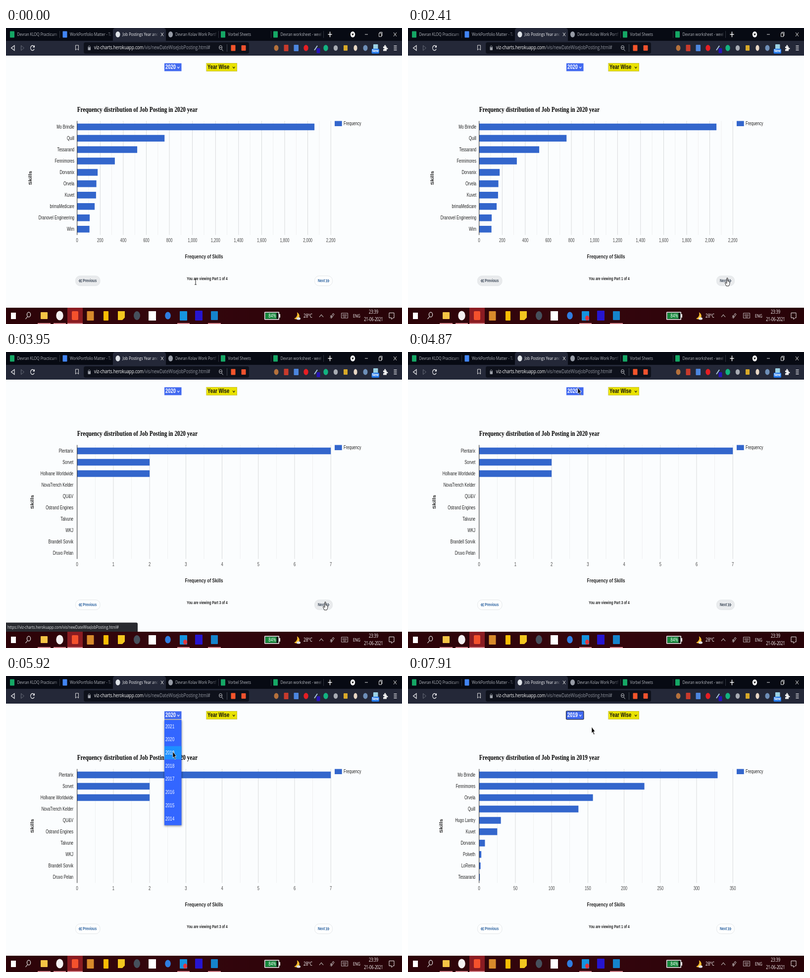
An HTML page with a canvas for the animation above (8000 ms loop, 800 px wide and 600 px high).

```html
<!DOCTYPE html>
<html lang="en">
<head>
<meta charset="utf-8">
<title>Job posting charts</title>
<style>
html, body { margin: 0; width: 100%; height: 100%; overflow: hidden; background: #fbfdfe; }
canvas { display: block; }
</style>
</head>
<body>
<canvas id="stage" width="800" height="600"></canvas>
<script>
const ctx = document.getElementById('stage').getContext('2d');
const LOOP = 8000;
const SQUEEZE = 0.75; // the 1366x768 desktop is shown at 4:3
const SANS = '"Liberation Sans", Arial, sans-serif';
const SERIF = '"Liberation Serif", serif';
const UI = '"Open Sans", sans-serif';
const BLUE = '#3366cc';
const URL_HOST = 'viz-charts.herokuapp.com';
const URL_PATH = '/vis/newDateWiseJobPosting.html#';

const charts = [
  { year: 2020, part: 1, max: 2200, step: 200, labelX: 138, skillsX: 50,
    names: ['Mo Brindle', 'Quill', 'Tessarand', 'Fennimores', 'Dorvanix', 'Orvela', 'Kuvet',
      'brimaMedicare', 'Dranovel Engineering', 'Wim'],
    values: [2058, 758, 521, 327, 178, 167, 164, 152, 109, 107] },
  { year: 2020, part: 2, max: 100, step: 10, labelX: 136, skillsX: 56,
    names: ['Hugo Lantry', 'Polveth', 'Gravet Holdings', 'QRV Tolven', 'Norwick Appliances',
      'LoRema', 'Fern Kit', 'Tarn Bulvo', 'QXTD', 'Trust of Velmora'],
    values: [91, 90, 63, 48, 46, 42, 32, 20, 17, 11] },
  { year: 2020, part: 3, max: 7, step: 1, labelX: 136, skillsX: 54,
    names: ['Plentarix', 'Sorvet', 'Hollvane Worldwide', 'NovaTrench Kelder', 'QU&V',
      'Ostrand Engines', 'Talvune', 'WKJ', 'Brandell Sorvik', 'Druvo Pelan'],
    values: [7, 2, 2, 0, 0, 0, 0, 0, 0, 0] },
  { year: 2019, part: 1, max: 350, step: 50, labelX: 136, skillsX: 68,
    names: ['Mo Brindle', 'Fennimores', 'Orvela', 'Quill', 'Hugo Lantry', 'Kuvet', 'Dorvanix',
      'Polveth', 'LoRema', 'Tessarand'],
    values: [329, 228, 157, 137, 30, 25, 8, 3, 2, 1] }
];

// Pointer bursts: first step, last step, number of steps, target x, y
const moves = [
  [40, 470, 4, 470, 535], [1080, 1400, 3, 684, 572], [1760, 1760, 1, 660, 525],
  [1920, 2090, 2, 645, 507], [4260, 4410, 2, 600, 440], [4710, 4870, 2, 343, 72],
  [5330, 5920, 5, 337, 153], [7250, 7580, 3, 408, 126], [7740, 7910, 2, 371, 103]
];

function pointerAt(t) {
  let x = 383, y = 508;
  for (const [start, end, steps, tx, ty] of moves) {
    if (t < start) break;
    const interval = (end - start) / Math.max(1, steps - 1) || 1;
    const k = Math.min(steps, Math.floor((t - start) / interval + 0.01) + 1) / steps;
    x += (tx - x) * k;
    y += (ty - y) * k;
  }
  return [x, y];
}

function rect(x, y, w, h, color, radius = 0) {
  ctx.fillStyle = color;
  ctx.beginPath();
  ctx.roundRect(x, y, w, h, radius);
  ctx.fill();
}

function dot(x, y, rx, ry, color) {
  ctx.fillStyle = color;
  ctx.beginPath();
  ctx.ellipse(x, y, rx, ry, 0, 0, 7);
  ctx.fill();
}

function ring(x, y, rx, ry, color, from = 0, to = 7) {
  ctx.strokeStyle = color;
  ctx.beginPath();
  ctx.ellipse(x, y, rx, ry, 0, from, to);
  ctx.stroke();
}

function path(d, x, y, stroke, fill, width = 1) {
  ctx.save();
  ctx.translate(x, y);
  const shape = new Path2D(d);
  if (fill) { ctx.fillStyle = fill; ctx.fill(shape); }
  if (stroke) { ctx.strokeStyle = stroke; ctx.lineWidth = width; ctx.stroke(shape); }
  ctx.restore();
}

function text(str, x, y, size, { font = SANS, color = '#222', align = 'left', weight = '', angle = 0 } = {}) {
  ctx.save();
  ctx.translate(x, y);
  ctx.scale(SQUEEZE, 1);
  ctx.rotate(angle);
  ctx.font = `${weight} ${size}px ${font}`;
  ctx.textAlign = align;
  ctx.textBaseline = 'middle';
  ctx.fillStyle = color;
  ctx.fillText(str, 0, 0);
  ctx.restore();
}

function tab(x, end, label, icon, active) {
  if (active) rect(x, 0, end - x, 27, '#242838', [5, 5, 0, 0]);
  if (icon) rect(x + 8, 6.5, 9, 13, icon, 1);
  else dot(x + 10, 13, 4.6, 6, active ? '#dfe3e8' : '#969ba5');
  const limit = end - (active ? 17 : 4);
  ctx.save();
  ctx.beginPath();
  ctx.rect(x, 0, limit - x, 26);
  ctx.clip();
  const fade = ctx.createLinearGradient(0, 0, (limit - x - 20) / SQUEEZE, 0);
  const color = active ? '#f4f5f7' : '#b4b7be';
  fade.addColorStop(0.85, color);
  fade.addColorStop(1, color + '50');
  text(label, x + (icon ? 22.5 : 19.5), 13, 9.7, { font: UI, color: fade });
  ctx.restore();
}

function drawBrowser() {
  rect(0, 0, 800, 27, '#070a13');
  rect(0, 26, 800, 30, '#242838');
  tab(0, 108, 'Devran KLDQ Practicum Gro', '#15a765');
  tab(106.5, 216, 'WorkPortfolio Matter - Ta', '#4285f4');
  tab(216, 323, 'Job Postings Year and', null, true);
  tab(322.5, 429, 'Devran Kolav Work Portfolio', null);
  tab(426, 535, 'Vorbel Sheets', '#15a765');
  tab(532, 641, 'Devran worksheet - week3', '#15a765');
  for (const x of [108, 429, 535, 641]) rect(x, 6, 0.8, 14, '#3a3e49');
  path('M0 0L5 7M5 0L0 7', 313, 9.5, '#eee');
  path('M0 4H8M4 -1.5V9.5', 650.5, 9, '#fff', null, 1.4);
  dot(700.5, 13, 4.7, 6, '#fff');
  path('M0 0H5L2.5 4Z', 698, 11.5, null, '#111');
  path('M0 0H6', 725, 13, '#ddd');
  path('M0 2H5V9H0ZM1.5 2V0H6.5V7H5', 753.5, 8.5, '#ddd');
  path('M0 0L6 8M6 0L0 8', 783, 9, '#ddd');

  path('M6.5 0V10L0 5Z', 10.5, 35.5, '#f0f0f2', null, 1.2);
  path('M0 0V10L6 5Z', 30.5, 35.5, '#686d79');
  ctx.lineWidth = 1.3;
  ring(53.5, 40.5, 3.8, 5, '#f0f0f2', 0.4, 5.5);
  path('M4 0V5H0Z', 54, 34.5, null, '#f0f0f2');
  path('M0 0H6V10L3 7L0 10Z', 140.5, 35, '#ddd');
  rect(157, 29, 334, 23, '#0e111b', 4);
  rect(165.5, 39, 5.5, 6, '#9ca0a8', 1);
  path('M0 4V2Q2 -2 4 2V4', 166.2, 36, '#9ca0a8');
  text(URL_HOST, 178, 40.5, 11, { font: UI, color: '#fff' });
  text(URL_PATH, 278, 40.5, 11, { font: UI, color: '#9599a3' });
  ctx.lineWidth = 1;
  ring(433.5, 39.5, 3, 4, '#c8cad0');
  path('M0 0L3 4M-4 -3H0', 435.5, 42.5, '#c8cad0');
  rect(446, 33, 0.8, 15, '#555a66');
  rect(454.5, 34.5, 9, 12, '#f4552b', 1);
  rect(475.5, 35, 9, 11, '#f0522e', 1);

  dot(546, 40.5, 4.5, 6, '#b5713c');
  rect(561.5, 34, 9, 13, '#c83a2c', 1);
  rect(581.5, 34, 9.5, 13, '#4c86df', 1);
  dot(606, 40.5, 4.7, 6.2, '#e51e24');
  path('M0 9L6 0', 623, 36, '#a9c5df', null, 2);
  rect(627.5, 41, 7, 10, '#2714b8', 1);
  dot(646, 40.5, 4.7, 6.2, '#13b381');
  dot(666, 40.5, 4.2, 5.5, '#a8acb4');
  rect(682, 35, 8, 11, '#d8a928', 1);
  dot(706, 40.5, 3.6, 6, '#e8d7c5');
  dot(726, 40.5, 4.5, 6, '#6e8fb8');
  rect(742, 33, 9.5, 10, '#9ad0e3', 1);
  rect(738.5, 42, 15.5, 10, '#1a73e8', 2);
  text('New', 746.2, 47.3, 8, { font: UI, color: '#fff', align: 'center', weight: 'bold' });
  path('M0 3H2.5Q1.5 0 4 0Q6 0 5 3H7V6Q10 5 9.5 8Q9 9 7 8.5V12H0V8.5Q3 8 2.5 7Q2 6 0 6.5Z', 762, 34.5, null, '#eee');
  path('M0 0H6M0 4H6M0 8H6', 783.5, 36.5, '#e4e4e8', null, 1.3);
}

function drawTaskbar(t) {
  const shade = ctx.createLinearGradient(0, 0, 800, 0);
  shade.addColorStop(0, '#2c0308');
  shade.addColorStop(0.4, '#35060d');
  shade.addColorStop(1, '#280308');
  rect(0, 567, 800, 33, shade);
  rect(124, 567, 31, 33, '#8a1c22');
  for (const [x, w] of [[64, 26], [96, 25], [124, 31], [346, 25], [408, 26]]) rect(x, 598, w, 2, '#d98a92');
  rect(10, 577, 10, 13, '#fff');
  ctx.lineWidth = 1.2;
  ring(46, 581, 3.6, 4.8, '#eee');
  path('M0 0L-4 5', 43.5, 585, '#eee', null, 1.2);
  rect(70, 576, 14, 14, '#f5c445', 1);
  dot(108.5, 583, 7.2, 9.5, '#f3f0f1');
  rect(133, 574, 13, 18, '#f4512c', 2);
  rect(163.5, 574, 14, 19, '#d88a2b', 1);
  rect(197, 574, 10, 19, '#fbbc04', 1);
  path('M0 0H14V13L9 18H0Z', 226, 574, null, '#f3c71f');
  dot(264.5, 583, 6.5, 9, '#46505c');
  rect(288, 574, 15, 19, '#fff');
  dot(327, 583, 5.8, 7.5, '#2f7de1');
  rect(351, 574, 15, 19, '#1593df', 1);
  if (t >= 180) dot(362, 588, 4, 5, '#e0363d');
  rect(382, 573, 15, 20, '#2615cf', 1);
  rect(414, 574, 14, 18, '#1583cc', 1);

  rect(522, 575.5, 30, 16, '#fff', 1);
  rect(552, 580, 2, 7, '#fff');
  rect(523.5, 577, 27, 13, '#111');
  rect(524, 577.5, 22.5, 12, '#168a3c');
  text('84%', 538, 584, 10.5, { font: UI, color: '#fff', align: 'center' });
  path('M5 0Q13 6 8 13Q5 16 -1 13Q7 10 5 0Z', 583, 576, null, '#f5bd2c');
  dot(591, 589, 4, 2.6, '#dfe2e8');
  text('28°C', 601, 584, 10.9, { font: UI, color: '#fff' });
  path('M0 5L4 0L8 5', 633, 581, '#eee');
  path('M0 10L6 1L8 3L2 11Q5 6 0 6', 655, 577.5, '#ddd');
  if (t >= 1400 && t < 2090) rect(671, 567, 26, 33, '#54343a');
  path('M0 0H13V10H0ZM2 3H11M2 5.5H11M4 8H9', 677.5, 578, '#ddd', null, 0.8);
  text('ENG', 701, 584, 9.6, { font: UI, color: '#fff' });
  text('23:39', 742.5, 576, 9.9, { font: UI, color: '#fff', align: 'center' });
  text('21-06-2021', 742.5, 591.5, 9.9, { font: UI, color: '#fff', align: 'center' });
  path('M0 0H10V10H8L5 13V10H0Z', 774, 577.5, '#eee');
}

function drawChart(chart) {
  const left = 143.7, width = 512.5;
  const xOf = value => left + width * value / chart.max;
  text(`Frequency distribution of Job Posting in ${chart.year} year`, left, 166, 15,
    { font: SERIF, weight: 'bold', color: '#000' });
  for (let v = 0; v <= chart.max; v += chart.step) {
    rect(xOf(v) - 0.4, 188.5, 0.8, 231, '#cfd1d3');
    if (v < chart.max) rect(xOf(v + chart.step / 2) - 0.4, 188.5, 0.8, 231, '#ebeced');
    text(v.toLocaleString('en-US'), xOf(v), 431, 10.1, { align: 'center', color: '#444' });
  }
  chart.names.forEach((name, i) => {
    const y = 200.5 + i * 23.03;
    rect(left, y - 6.8, xOf(chart.values[i]) - left, 13.6, BLUE);
    text(name, chart.labelX, y + 0.5, 10, { align: 'right' });
  });
  rect(left - 0.5, 188.5, 1, 231, '#333');
  rect(664, 188.5, 14.7, 10.5, BLUE);
  text('Frequency', 682, 194.5, 10);
  text('Frequency of Skills', 400, 464, 11.2, { align: 'center', weight: 'bold' });
  text('Skills', chart.skillsX, 304, 10.9, { align: 'center', weight: 'bold', angle: -Math.PI / 2 });
  text(`You are viewing Part ${chart.part} of 4`, 406.5, 509, 8.7, { align: 'center', weight: 'bold' });
}

function pill(x, w, label, labelX, chevronX, chevron, grey) {
  rect(x, 502.5, w, 20, grey ? '#e9ebed' : '#fdfefe', 9);
  ctx.strokeStyle = '#dfe2e5';
  ctx.lineWidth = 0.8;
  ctx.stroke();
  const color = grey ? '#3c4858' : '#2b62a0';
  text(label, labelX, 513, 8.9, { color, weight: 'bold' });
  path(chevron, chevronX, 509.5, color, null, 1.2);
}

function selectBox(x, w, label, fill, color) {
  rect(x, 71.5, w, 16, fill);
  text(label, x + 2, 80, 12.5, { color, weight: 'bold' });
  path('M0 0L2.2 3L4.4 0', x + w - 8.5, 78.5, color, null, 1.1);
}

function drawMenu(pointerY) {
  ctx.save();
  ctx.shadowColor = '#0007';
  ctx.shadowBlur = 4;
  ctx.shadowOffsetY = 1;
  rect(320, 88.5, 34.5, 214, '#3366ff');
  ctx.restore();
  rect(320, 88, 34.5, 0.9, '#cdbb8a');
  for (let i = 0; i < 8; i++) {
    const top = 88.9 + i * 26.7;
    if (pointerY >= top && pointerY < top + 26.7) rect(320, top, 34.5, 26.7, '#1e90ff');
    text(2021 - i, 322, top + 13.7, 10.9, { color: '#fff' });
  }
}

function drawPointer(t, x, y) {
  if (t < 40) path('M-2 0H2M0 0V11M-2 11H2', x, y + 1, '#222');
  else if (t >= 2090 && t < 4260)
    path('M-1 0Q0 -1 1 0V6L4 7Q5 8 5 11Q4 14 3 16H-2L-4 11Q-5 8 -3 9L-1 11Z', x, y, '#111', '#fff', 0.9);
  else path('M0 0V13L2.3 10.5L4.3 16L6 15L4 9.7H7Z', x, y, '#fff', '#000', 0.7);
}

function draw(t) {
  const chart = charts[t < 2690 ? 0 : t < 3950 ? 1 : t < 6520 ? 2 : 3];
  const [x, y] = pointerAt(t);
  rect(0, 0, 800, 600, '#fbfdfe');
  drawBrowser();
  drawChart(chart);
  pill(140.5, 49.5, 'Previous', 155, 147, 'M3 0L0.5 3L3 6M6 0L3.5 3L6 6', t < 2690);
  pill(623.5, 36, 'Next', 630, 646.5, 'M0 0L2.5 3L0 6M3.5 0L6 3L3.5 6', t >= 2090 && t < 5330);

  if (t >= 6520) rect(319, 70.5, 36.5, 18, '#111', 2);
  selectBox(320, 34.5, chart.year, '#4169f0', '#fff');
  rect(404.5, 71, 62.5, 17, '#aaa56a');
  selectBox(405, 61.5, 'Year Wise', '#e9e200', '#111');
  if (t >= 5330 && t < 6520) drawMenu(y);

  if (t >= 2690 && t < 4710) {
    rect(0, 548.5, 266, 19, '#292a2f', [0, 3, 0, 0]);
    text('https://' + URL_HOST + URL_PATH, 3, 558.5, 9.45, { font: UI, color: '#e2e3e6' });
  }
  drawTaskbar(t);
  drawPointer(t, x, y);
}

function frame() {
  draw(performance.now() % LOOP);
  requestAnimationFrame(frame);
}
frame();
</script>
</body>
</html>
```
